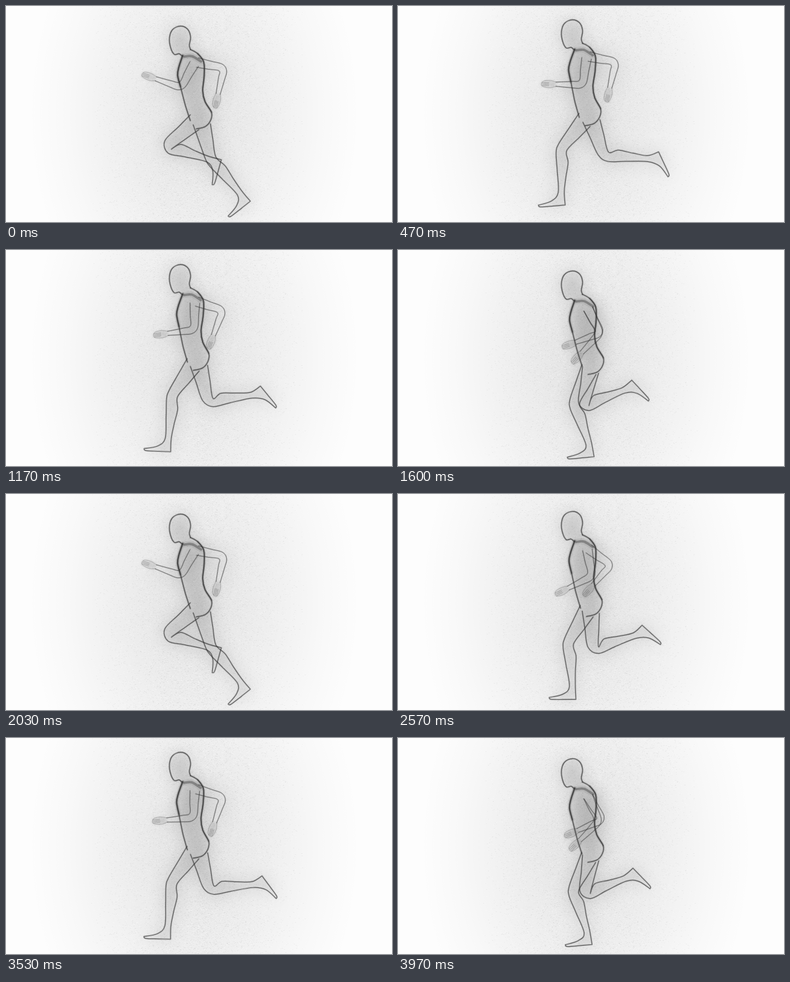
An HTML page with a canvas for the animation above (4010 ms loop, 640 by 360 pixels).

```html
<!DOCTYPE html>
<html lang="en">
<head>
<meta charset="utf-8">
<title>Pencil runner</title>
<style>
  html, body { margin: 0; width: 100%; height: 100%; overflow: hidden; background: #fdfdfd; }
  canvas { display: block; width: 640px; height: 360px; }
</style>
</head>
<body>
<canvas id="stage" width="640" height="360"></canvas>
<script>
const W = 640, H = 360, LOOP = 4010, FRAME = 100 / 3, LAST = 119;
const STEP_FRAMES = 61 / 6;            // frames from one footfall to the next
const ctx = document.getElementById('stage').getContext('2d');

// Sum of sines over a stride of two steps: mean, then [cos, sin] per harmonic
const swing = (mean, ...waves) => u =>
  waves.reduce((sum, [c, s], i) => {
    const a = (i + 1) * Math.PI * u;
    return sum + c * Math.cos(a) + s * Math.sin(a);
  }, mean);

// Joint angles in degrees: 0 hangs down, positive swings forward
const thigh = swing(13.4, [28.4, 25.4], [3.1, -3.9], [3.5, 4.3]);
const shin = swing(-54, [-19.9, 47.2], [-2.9, 12.9], [-.7, -6.8], [0, 0], [4, 0]);
const ankleBend = swing(64.6, [-3.4, 16.6], [7.8, -5.8], [1.9, 1.4]);
const upperArm = swing(-28.6, [48.8, 33.7], [4.7, -3.5], [5, 3.7]);
const forearm = swing(55.4, [48.2, 22.9], [4.7, -.9]);

// The body rises and falls once per step
const bob = (s, mean, size, peak) => mean - size * Math.cos(2 * Math.PI * (s - peak));

function reach([x, y], length, degrees) {
  const a = degrees * Math.PI / 180;
  return [x - length * Math.sin(a), y + length * Math.cos(a)];
}

// Point at fraction t from p to q, pushed w sideways (positive is the front)
function at(p, q, t, w) {
  const dx = q[0] - p[0], dy = q[1] - p[1], len = Math.hypot(dx, dy) || 1;
  return [p[0] + dx * t - dy / len * w, p[1] + dy * t + dx / len * w];
}
const along = (p, q, ...profile) => profile.map(([t, w]) => at(p, q, t, w));

function trace(path, pts, join) {
  if (join) path.lineTo(...pts[0]); else path.moveTo(...pts[0]);
  for (let i = 0; i < pts.length - 1; i++) {
    const a = pts[i - 1] || pts[i], b = pts[i], c = pts[i + 1], d = pts[i + 2] || c;
    path.bezierCurveTo(
      b[0] + (c[0] - a[0]) / 6, b[1] + (c[1] - a[1]) / 6,
      c[0] - (d[0] - b[0]) / 6, c[1] - (d[1] - b[1]) / 6, c[0], c[1]);
  }
  return path;
}
const curve = pts => trace(new Path2D(), pts);

function pencil(path, width, alpha) {
  for (const [w, a] of [[2.4, .22], [1, 1]]) {
    ctx.strokeStyle = `rgba(50,50,50,${alpha * a})`;
    ctx.lineWidth = width * w;
    ctx.stroke(path);
  }
}

function legPath(hip, u) {
  const knee = reach(hip, 74, thigh(u));
  const ankle = reach(knee, 77, shin(u));
  const toe = reach(ankle, 41, shin(u) + ankleBend(u));
  const heel = at(ankle, toe, 0, -17);
  const path = curve([
    ...along(hip, knee, [.12, 14], [.5, 12], [.94, 9.5]),
    ...along(knee, ankle, [.07, 9], [.45, 7], [.93, 5]),
    ...along(ankle, toe, [.45, -2], [1, 0])
  ]);
  trace(path, [toe, ...along(ankle, toe, [.95, -4], [.45, -11]), heel], true);
  trace(path, [
    heel,
    ...along(knee, ankle, [.92, -5], [.6, -7.5], [.28, -11]),
    ...along(hip, knee, [.95, -8], [.55, -11], [.2, -14])
  ], true);
  return path;
}

function armPaths(shoulder, u) {
  const elbow = reach(shoulder, 48, upperArm(u));
  const tip = reach(elbow, 68, forearm(u));
  const wrist = at(elbow, tip, .64, 0);
  const arm = curve([
    ...along(shoulder, elbow, [.08, 8], [.5, 7], [.87, 6]),
    ...along(elbow, wrist, [.4, 5], [1, 3.5])
  ]);
  trace(arm, [
    ...along(shoulder, elbow, [.08, -8], [.5, -7], [.94, -6]),
    ...along(elbow, wrist, [.08, -6], [.45, -5.5], [1, -3.5])
  ]);
  const hand = curve(along(wrist, tip,
    [0, 3.5], [.4, 6], [.85, 5], [1, 0], [.9, -4], [.4, -6], [0, -3.5]));
  const fingers = new Path2D();
  for (const w of [-2.5, 0, 2.5]) trace(fingers, along(wrist, tip, [.5, w], [.95, w]));
  return { arm, hand, fingers };
}

function makePaper() {
  const paper = document.createElement('canvas');
  paper.width = W; paper.height = H;
  const g = paper.getContext('2d');
  g.fillStyle = '#fdfdfd';
  g.fillRect(0, 0, W, H);
  g.save();
  g.translate(312, 180);
  g.scale(1, 1.5);
  const shade = g.createRadialGradient(0, 0, 20, 0, 0, 275);
  shade.addColorStop(0, 'rgba(0,0,0,.1)');
  shade.addColorStop(.4, 'rgba(0,0,0,.06)');
  shade.addColorStop(.75, 'rgba(0,0,0,.02)');
  shade.addColorStop(1, 'rgba(0,0,0,0)');
  g.fillStyle = shade;
  g.fillRect(-W, -H, W * 2, H * 2);
  g.restore();
  // faint paper grain
  let seed = 7;
  const rnd = () => (seed = seed * 16807 % 2147483647) / 2147483647;
  for (let i = 0; i < 16000; i++) {
    const x = 140 + (rnd() + rnd()) * 180, y = rnd() * H;
    g.fillStyle = i % 2 ? 'rgba(0,0,0,.035)' : 'rgba(255,255,255,.22)';
    g.fillRect(x | 0, y | 0, 1 + rnd() * 2 | 0, 1);
  }
  return paper;
}
const paper = makePaper();

function draw(frame) {
  const phase = frame / STEP_FRAMES;
  const headY = bob(phase, -4.2, 7, .34);
  const hipX = bob(phase, -2.5, 3, .37), hipY = bob(phase, -2.5, 4.5, .3);
  // The trunk blends from the head's shift to the hip's shift
  const fit = pts => pts.map(([x, y]) => {
    const k = Math.min(1, Math.max(0, (y - 82) / 103));
    return [x + 1 + (hipX - 1) * k, y + headY + (hipY - headY) * k];
  });
  const [hip, shoulder] = fit([[322, 187], [313, 94]]);
  const legs = [0, 1].map(o => legPath(hip, phase + o));
  const arms = [0, 1].map(o => armPaths(shoulder, phase + o));

  const skull = fit([[305, 73], [303, 66], [305, 52], [300, 39], [288, 34], [275, 40],
    [270, 54], [272, 70], [278, 81], [286, 80], [291, 84]]);
  const front = fit([[292, 83], [286, 102], [284, 116], [289, 135], [293, 150], [298, 168], [306, 192]]);
  const back = fit([[305, 73], [317, 80], [327, 94], [328, 118], [326, 142], [330, 160],
    [341, 178], [340, 191], [331, 202], [316, 206]]);
  const head = curve(skull), trunk = curve(front);
  trace(trunk, back.slice().reverse(), true);
  const yoke = [at(front[0], back[2], .08, 1), at(front[0], back[1], .6, 3), at(back[1], back[2], .8, 3)];

  ctx.filter = 'none';
  ctx.drawImage(paper, 0, 0);
  ctx.lineCap = ctx.lineJoin = 'round';

  const mass = new Path2D();
  for (const p of [head, trunk, ...legs]) mass.addPath(p);
  ctx.filter = 'blur(14px)';
  ctx.fillStyle = 'rgba(0,0,0,.13)';
  ctx.fill(mass);
  ctx.strokeStyle = 'rgba(0,0,0,.05)';
  ctx.lineWidth = 16;
  for (const a of arms) ctx.stroke(a.arm);
  ctx.filter = 'blur(2px)';
  ctx.fillStyle = 'rgba(0,0,0,.035)';
  ctx.fill(mass);
  ctx.fillStyle = 'rgba(0,0,0,.1)';
  for (const a of arms) ctx.fill(a.hand);
  ctx.filter = 'none';

  for (const a of arms) {
    pencil(a.arm, 1, .6);
    pencil(a.hand, .8, .25);
    pencil(a.fingers, .7, .3);
  }
  for (const leg of legs) pencil(leg, 1.2, .7);
  pencil(head, 1.4, .72);
  pencil(curve(front), 1.5, .7);
  pencil(curve(back), 1.5, .7);
  pencil(curve(front.slice(0, 4)), 2.8, .5);
  pencil(curve(back.slice(1, 7)), 2, .45);
  pencil(curve(yoke), 4, .4);
}

let shown = -1;
function tick() {
  const t = performance.now() % LOOP;
  const frame = Math.min(LAST, Math.floor((t + 5) / FRAME));
  if (frame !== shown) draw(shown = frame);
  requestAnimationFrame(tick);
}
tick();
</script>
</body>
</html>
```
